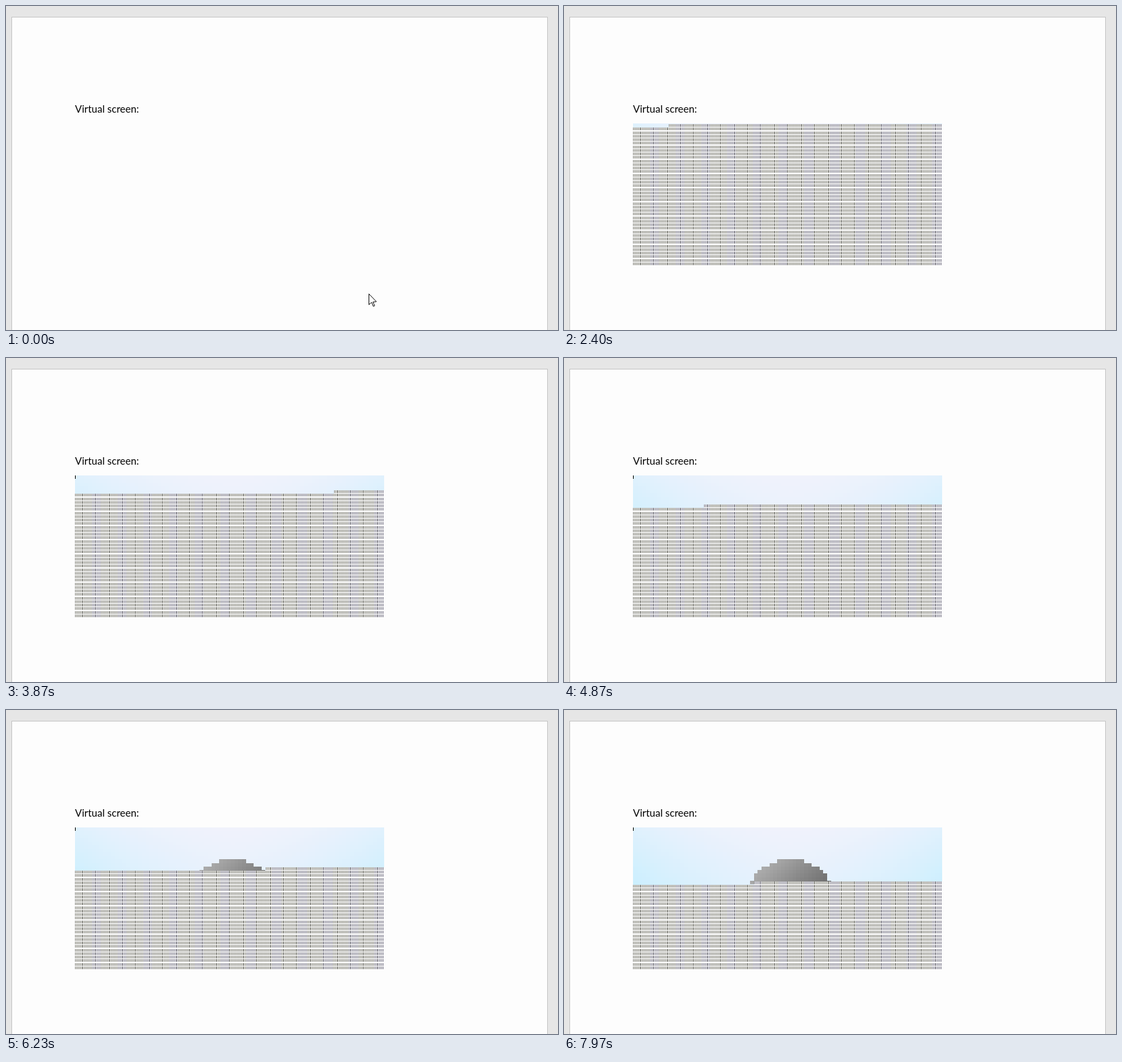
Recreate the animation shown at these times as an HTML page with a canvas. Size 816 by 480 pixels, loop 8 s.

```html
<!DOCTYPE html>
<html lang="en">
<head>
<meta charset="utf-8">
<title>Virtual screen</title>
<style>
  html, body { margin: 0; width: 816px; height: 480px; overflow: hidden; background: #e6e6e6; }
  canvas, svg { position: absolute; left: 0; top: 0; display: block; }
  text { font: 15px Lato, sans-serif; fill: #000; }
</style>
</head>
<body>
<canvas id="stage" width="816" height="480"></canvas>
<svg width="816" height="480"><text x="102" y="158">Virtual screen:</text></svg>
<script>
const LOOP = 8000, STEP = 1000 / 30;
const DESK = '#e6e6e6', EDGE = '#c6c6c6', PAPER = '#fdfdfd';
const LEFT = 102, RIGHT = 559, ROWS = 40, CHAR = 1.904, PER_ROW = 240;
const CELL = 5.7, CELL_X = 98.3, DOME_X = 334.9, DOME_ROW = 9;
// half widths of the dome in cells, from its top row down
const DOME = [3.5, 5.5, 7.5, 8.5, 9.5, 9.5, 10.5];
// time in ms, rows painted so far
const PROGRESS = [[2370, 0], [2730, 1.43], [3870, 4.84], [4870, 8.23], [6230, 11.62], [8000, 15.46]];
const ARROW = [[0, 0], [0, 16], [4, 12.5], [6.5, 18.5], [8.5, 17.5], [6, 12], [11, 11.5]];

const ctx = document.getElementById('stage').getContext('2d');
const clamp = v => Math.max(0, Math.min(1, v));
const rowTop = r => Math.floor(174.6 + 5.25 * r);

function rect(c, color, x, y, w, h) {
  c.fillStyle = color;
  c.fillRect(x, y, w, h);
}

function mix(a, b, t) {
  return `rgb(${a.map((v, i) => Math.round(v + (b[i] - v) * clamp(t)))})`;
}

function layer(draw) {
  const c = document.createElement('canvas');
  c.width = 816;
  c.height = 480;
  draw(c.getContext('2d'));
  return c;
}

// tiny unpainted characters
const blank = layer(c => {
  for (let r = 0; r < ROWS; r++) {
    const y = Math.round(175.2 + 5.25 * r);
    for (let i = 0; i < PER_ROW; i++) {
      const x = LEFT + Math.round(i * CHAR);
      const cool = (x - LEFT) % 38 >= 24;
      rect(c, cool ? '#f0f0f9' : '#f5f5f0', x, y, 2, 4);
      rect(c, cool ? '#8d8c92' : '#8d8d88', x, y, 1, 4);
    }
  }
});

function cellColor(x, y, r) {
  const half = DOME[r - DOME_ROW];
  if (half && Math.abs(x - DOME_X) < half * CELL) {
    return mix([188, 188, 188], [108, 108, 108], (x - 275) / 118 * 0.75 + (y - 221) / 36 * 0.25);
  }
  const u = Math.abs(x - DOME_X) / 230, v = (y - 175) / 85;
  return mix([240, 242, 252], [203, 239, 254], u * u * 0.45 + v * (0.25 + 0.3 * u));
}

// the finished picture
const picture = layer(c => {
  for (let r = 0; r < 17; r++) {
    const y = rowTop(r), h = rowTop(r + 1) - y;
    for (let i = 0; i < 81; i++) {
      const edge = CELL_X + i * CELL;
      const x = Math.max(LEFT, Math.round(edge));
      const end = Math.min(RIGHT, Math.round(edge + CELL));
      if (end > x) rect(c, cellColor(edge + CELL / 2, y + h / 2, r), x, y, end - x, h);
    }
  }
});

function painted(t) {
  const i = PROGRESS.findIndex(p => p[0] > t);
  const [t0, a] = PROGRESS[i - 1], [t1, b] = PROGRESS[i];
  return a + (b - a) * (t - t0) / (t1 - t0);
}

function reveal(y, w, end) {
  const h = end - y;
  if (w <= 0 || h <= 0) return;
  rect(ctx, PAPER, LEFT, y, w, h);
  ctx.drawImage(picture, LEFT, y, w, h, LEFT, y, w, h);
}

function drawScreen(t) {
  ctx.drawImage(blank, 0, 0);
  const p = painted(t), row = Math.floor(p), y = rowTop(row);
  reveal(rowTop(0), RIGHT - LEFT, y + 1);
  reveal(y, Math.round(Math.floor((p - row) * PER_ROW) * CHAR), rowTop(row + 1) + 1);
  if (t >= 3000) rect(ctx, '#000', 102, 174, 1, 5);
}

function drawCaret(t) {
  const alpha = Math.min(clamp((t - 1430) / 130), clamp((2090 - t) / 100));
  if (alpha > 0) rect(ctx, mix([253, 253, 253], [0, 0, 0], alpha), 102, 176, 1, 18);
}

function drawPointer(t) {
  if (t > 215) return;
  const k = t / 215;
  ctx.beginPath();
  for (const [x, y] of ARROW) ctx.lineTo(536.5 + x + 8 * k, 426.5 + y + 54 * k);
  ctx.closePath();
  ctx.fillStyle = '#fff';
  ctx.fill();
  ctx.strokeStyle = '#111';
  ctx.lineWidth = 1;
  ctx.stroke();
}

let last = -1;
function draw(now) {
  const n = Math.floor((now % LOOP + 4) / STEP) % 240;
  if (n !== last) {
    last = n;
    const t = Math.round(n * STEP / 10) * 10;
    rect(ctx, DESK, 0, 0, 816, 480);
    rect(ctx, EDGE, 8, 16, 793, 464);
    rect(ctx, PAPER, 9, 17, 791, 463);
    drawCaret(t);
    if (t >= 2370) drawScreen(t);
    drawPointer(t);
  }
  requestAnimationFrame(draw);
}
draw(performance.now());
</script>
</body>
</html>
```
